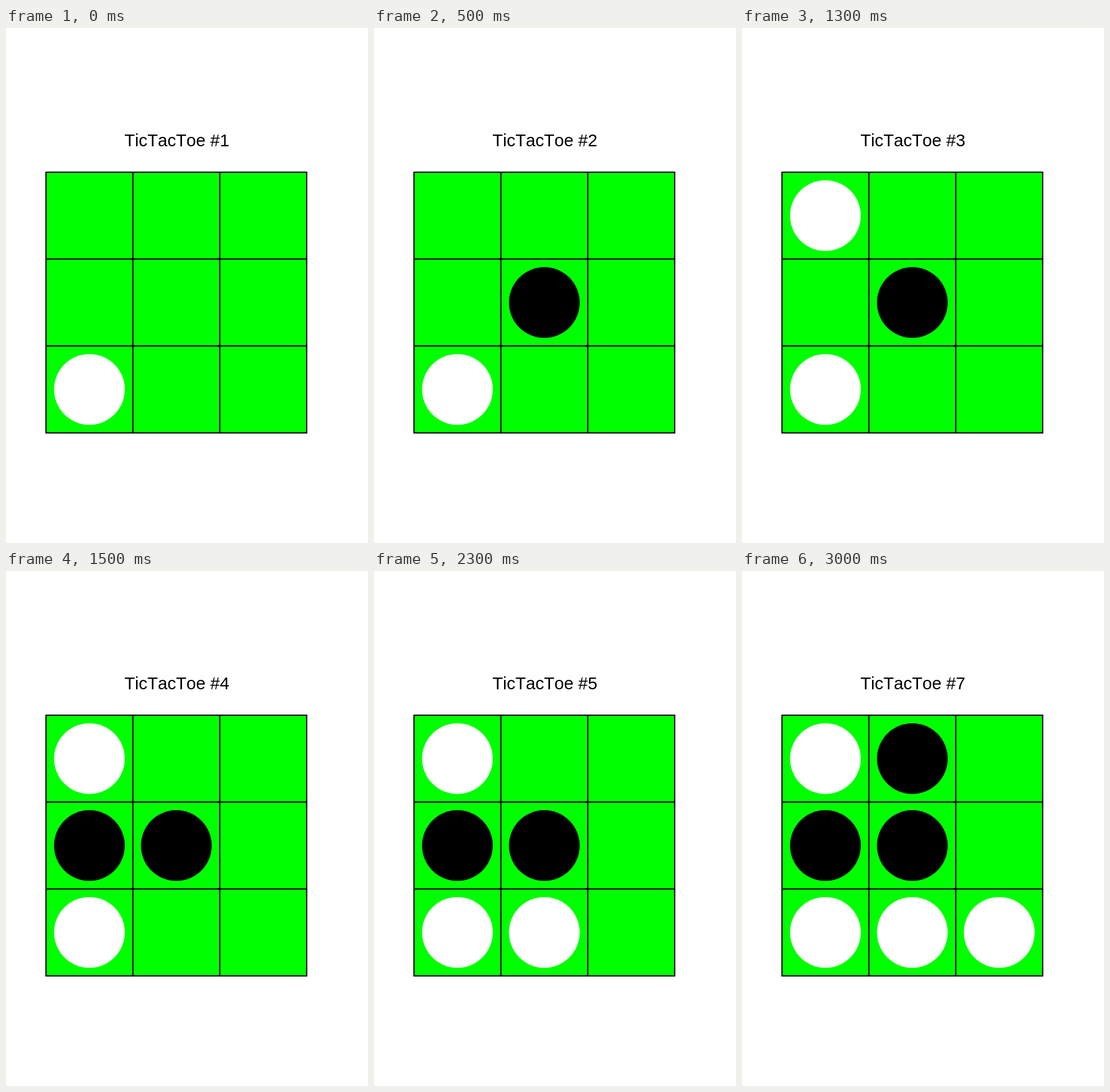
Write an HTML page that moves like this. It is 615x875 px and loops after 3500 ms.

```html
<!DOCTYPE html>
<html lang="en">
<head>
<meta charset="utf-8">
<title>TicTacToe</title>
<style>
  html, body { margin: 0; width: 100%; height: 100%; overflow: hidden; background: #fff; }
  svg { display: block; }
  text { font: 29.17px "Liberation Sans", Arial, sans-serif; font-kerning: none; }
</style>
</head>
<body>
<svg width="615" height="875" viewBox="0 0 615 875">
  <text id="title" x="201.3" y="201"></text>
  <g id="board" fill="#0f0" stroke="#000" stroke-width="2.083"></g>
  <g id="discs"></g>
</svg>
<script>
const CELL = 147.64, LEFT = 67.9, TOP = 245, STEP = 500;
const moves = [[0, 2], [1, 1], [0, 0], [0, 1], [1, 2], [1, 0], [2, 2]]; // column, row
const title = document.getElementById('title');

function add(parent, tag, attrs) {
  const node = document.createElementNS('http://www.w3.org/2000/svg', tag);
  for (const name in attrs) node.setAttribute(name, attrs[name]);
  return document.getElementById(parent).appendChild(node);
}

for (let i = 0; i < 9; i++) {
  add('board', 'rect', {
    x: LEFT + (i % 3) * CELL, y: TOP + Math.floor(i / 3) * CELL, width: CELL, height: CELL
  });
}

const discs = moves.map(([col, row], i) => add('discs', 'circle', {
  cx: LEFT + (col + 0.5) * CELL, cy: TOP + (row + 0.5) * CELL, r: 60.1,
  fill: i % 2 ? '#000' : '#fff'
}));

function draw() {
  const turn = Math.floor(performance.now() / STEP) % moves.length;
  title.textContent = `TicTacToe #${turn + 1}`;
  discs.forEach((disc, i) => disc.setAttribute('visibility', i <= turn ? 'visible' : 'hidden'));
  requestAnimationFrame(draw);
}
draw();
</script>
</body>
</html>
```
